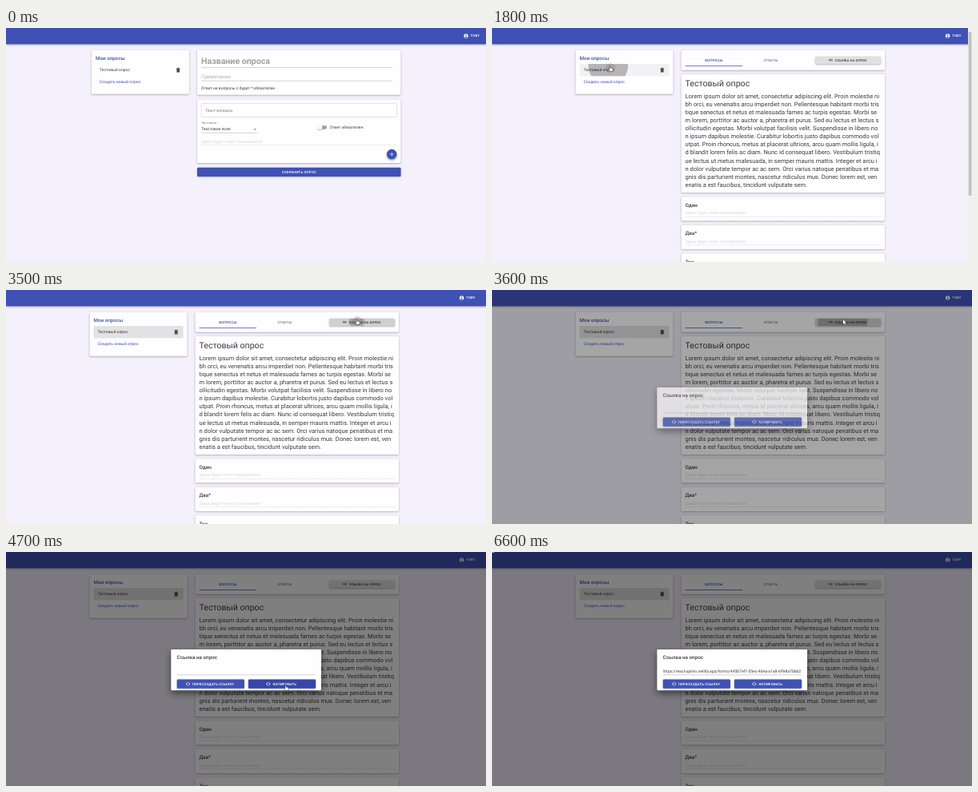
Recreate the animation shown at these times as an HTML page with a canvas. Size 600 px wide and 293 px high, loop 7.2 s.

```html
<!DOCTYPE html>
<html lang="ru">
<head>
<meta charset="utf-8">
<title>Опросы</title>
<style>
html, body { margin: 0; width: 100%; height: 100%; overflow: hidden; background: #f4f1fc; }
canvas { display: block; width: 600px; height: 293px; }
</style>
</head>
<body>
<canvas id="stage"></canvas>
<script>
const W = 600, H = 293, LOOP = 7200, STEP = 100;
const BLUE = '#3f51b5', PAPER = '#fefdff', INK = 'rgba(0,0,0,.77)', HINT = 'rgba(0,0,0,.17)';
const dpr = window.devicePixelRatio || 1;

function prepare(canvas) {
  canvas.width = W * dpr;
  canvas.height = H * dpr;
  const context = canvas.getContext('2d');
  context.scale(dpr, dpr);
  context.textRendering = 'geometricPrecision';
  return context;
}

const stage = prepare(document.getElementById('stage'));
const layer = prepare(document.createElement('canvas'));
let ctx = stage;

const LOREM = [
  'Lorem ipsum dolor sit amet, consectetur adipiscing elit. Proin molestie ni',
  'bh orci, eu venenatis arcu imperdiet non. Pellentesque habitant morbi tris',
  'tique senectus et netus et malesuada fames ac turpis egestas. Morbi se',
  'm lorem, porttitor ac auctor a, pharetra et purus. Sed eu lectus et lectus s',
  'ollicitudin egestas. Morbi volutpat facilisis velit. Suspendisse in libero no',
  'n ipsum dapibus molestie. Curabitur lobortis justo dapibus commodo vol',
  'utpat. Proin rhoncus, metus at placerat ultrices, arcu quam mollis ligula, i',
  'd blandit lorem felis ac diam. Nunc id consequat libero. Vestibulum tristiq',
  'ue lectus ut metus malesuada, in semper mauris mattis. Integer et arcu i',
  'n dolor vulputate tempor ac ac sem. Orci varius natoque penatibus et ma',
  'gnis dis parturient montes, nascetur ridiculus mus. Donec lorem est, ven',
  'enatis a est faucibus, tincidunt vulputate sem.'
];
const LINK = 'https://react-opinio.netlify.app/forms/445b7ef7-55ec-4d4a-a1a8-6ffe8a7bbb2';

// Pointer track: time, x, y
const TRACK = [
  [800, 483, 104], [1500, 147.5, 47.5], [1900, 147.5, 47.5], [2300, 187, 63],
  [3100, 438.5, 36.3], [3900, 438.5, 36.3], [4700, 349.5, 166.5],
  [5800, 349.5, 166.5], [6300, 514, 146]
];

const clamp = v => Math.min(1, Math.max(0, v));
const span = (t, from, length) => clamp((t - from) / length);
const within = (t, a, b) => t >= a && t < b;

// cubic-bezier(.4, 0, .2, 1)
function ease(x) {
  let lo = 0, hi = 1;
  for (let i = 0; i < 20; i++) {
    const u = (lo + hi) / 2, v = 1 - u;
    if (3 * v * v * u * .4 + 3 * v * u * u * .2 + u * u * u < x) lo = u; else hi = u;
  }
  return lo * lo * (3 - 2 * lo);
}

function shadow(y, blur, alpha) {
  ctx.shadowColor = `rgba(0,0,0,${alpha})`;
  ctx.shadowOffsetY = y * dpr;
  ctx.shadowBlur = blur * dpr;
}

function box(x, y, w, h, fill, r = 0) {
  ctx.beginPath();
  ctx.roundRect(x, y, w, h, r);
  ctx.fillStyle = fill;
  ctx.fill();
}

function raised(x, y, w, h, fill) {
  ctx.save();
  shadow(.7, 2.2, .34);
  box(x, y, w, h, fill, 1.25);
  ctx.restore();
}

function disc(x, y, r, fill) {
  ctx.beginPath();
  ctx.arc(x, y, r, 0, 7);
  ctx.fillStyle = fill;
  ctx.fill();
}

function path(points, color, width, dash = []) {
  ctx.beginPath();
  points.forEach(([x, y], i) => i ? ctx.lineTo(x, y) : ctx.moveTo(x, y));
  ctx.setLineDash(dash);
  ctx.strokeStyle = color;
  ctx.lineWidth = width;
  ctx.stroke();
  ctx.setLineDash([]);
}

const rule = (x1, x2, y, color = 'rgba(0,0,0,.42)', dash) =>
  path([[x1, y], [x2, y]], color, .4, dash);

// y is the middle of the line box
function text(str, x, y, size, color = INK, weight = 400, align = 'left', spacing = 0) {
  ctx.font = `${weight} ${size}px Roboto, sans-serif`;
  ctx.letterSpacing = spacing + 'px';
  ctx.textAlign = align;
  ctx.fillStyle = color;
  ctx.fillText(str, x, y + size * .342);
}

const caps = (str, x, y, color, align = 'left', size = 4.375) =>
  text(str, x, y, size, color, 500, align, size * .02857);

function appBar(right) {
  ctx.save();
  shadow(1, 2.6, .36);
  box(0, 0, W, 20.3, BLUE);
  ctx.restore();
  const x = right - 25;
  disc(x, 10, 2.7, '#fff');
  disc(x, 9.1, .85, BLUE);
  ctx.beginPath();
  ctx.ellipse(x, 11.6, 1.6, .8, 0, 0, 7);
  ctx.fill();
  caps('TOBY', right - 19.4, 10, '#fff');
}

function trash(x, y) {
  box(x - 1.9, y - 1.6, 3.8, 4.3, '#4c4c4c', .5);
  box(x - 2.3, y - 2.6, 4.6, .7, '#4c4c4c');
  box(x - .9, y - 3, 1.8, .6, '#4c4c4c');
}

function ripple(x, y, size, alpha, clip) {
  if (alpha <= 0 || size <= 0) return;
  ctx.save();
  ctx.beginPath();
  ctx.rect(...clip);
  ctx.clip();
  disc(x, y, size, `rgba(0,0,0,${alpha})`);
  ctx.restore();
}

function sidebar(t) {
  raised(107, 27.8, 122, 55, PAPER);
  text('Мои опросы', 112, 37.5, 6.25, BLUE, 500);
  const tint = t >= 2000 ? .11 : t >= 1400 ? .05 : 0;
  box(112, 45, 112, 15.3, `rgba(0,0,0,${tint})`);
  text('Тестовый опрос', 117, 52.5, 5);
  trash(215.2, 52.7);
  text('Создать новый опрос', 117, 67.7, 5, BLUE);
  ripple(147.7, 47, 78 * ease(span(t, 1645, 550)), .25 * (1 - span(t, 1850, 450)),
    [112, 45, 112, 15.3]);
}

function editor() {
  raised(239, 27.8, 254.5, 56, PAPER);
  text('Название опроса', 244, 41.3, 10.625, '#a2a2a2', 700);
  rule(244, 483, 49.6);
  text('Примечание', 244, 60.5, 6.25, '#b0b0b0');
  rule(244, 483, 66.2);
  text('Ответ на вопросы с будет * обязателен', 244, 75, 5);

  raised(239, 89.5, 254.5, 79.5, PAPER);
  ctx.beginPath();
  ctx.roundRect(244.2, 94.4, 244.6, 17, 1.25);
  ctx.strokeStyle = 'rgba(0,0,0,.3)';
  ctx.lineWidth = .4;
  ctx.stroke();
  text('Текст вопроса', 249, 102.9, 5, 'rgba(0,0,0,.54)');
  text('Тип ответа', 244, 118.6, 3.75, 'rgba(0,0,0,.54)');
  text('Текстовое поле', 244, 126.7, 5);
  rule(244, 315, 131.4);
  ctx.beginPath();
  ctx.moveTo(309.5, 126.3);
  ctx.lineTo(312.6, 126.3);
  ctx.lineTo(311.05, 127.9);
  ctx.fillStyle = 'rgba(0,0,0,.54)';
  ctx.fill();

  box(390.5, 122.3, 10.6, 4.4, '#9e9e9e', 2.2);
  ctx.save();
  shadow(.5, 1.2, .45);
  disc(392.4, 124.5, 3.1, '#fafafa');
  ctx.restore();
  text('Ответ обязателен', 404.5, 124.4, 5);
  text('Здесь будет ответ пользователя', 244, 141.8, 5, HINT);
  rule(244, 489, 146.6, 'rgba(0,0,0,.36)', [.6, .6]);

  ctx.save();
  shadow(1.2, 2.8, .45);
  disc(482.2, 158.1, 6.25, BLUE);
  ctx.restore();
  path([[480, 158.1], [484.4, 158.1]], '#fff', .65);
  path([[482.2, 155.9], [482.2, 160.3]], '#fff', .65);

  raised(239, 174.7, 254.5, 11.2, BLUE);
  caps('СОХРАНИТЬ ОПРОС', 366.3, 180.3, '#fff', 'center');
}

function linkIcon(x, y) {
  ctx.strokeStyle = '#444';
  ctx.lineWidth = .55;
  for (const dx of [-2.3, .3]) {
    ctx.beginPath();
    ctx.roundRect(x + dx, y - 1, 2, 2, 1);
    ctx.stroke();
  }
  path([[x - 1.2, y], [x + 1.2, y]], '#444', .55);
}

function linkButton(t) {
  raised(404.3, 35.7, 81.7, 9.4, within(t, 3000, 4000) ? '#d0d0d0' : '#e0e0e0');
  ripple(438.5, 39.5, 47.5 * ease(span(t, 3370, 550)), .2 * (1 - span(t, 3750, 450)),
    [404.3, 35.7, 81.7, 9.4]);
  linkIcon(423.3, 40.2);
  caps('ССЫЛКА НА ОПРОС', 428.7, 40.2, INK, 'left', 4.0625);
}

function survey(t) {
  raised(236.5, 27.8, 254.5, 25, PAPER);
  caps('ВОПРОСЫ', 277.3, 40.1, BLUE, 'center');
  caps('ОТВЕТЫ', 348.5, 40.1, 'rgba(0,0,0,.5)', 'center');
  box(241.5, 47.1, 71.5, .625, BLUE);
  linkButton(t);

  raised(236.5, 57.9, 254.5, 148.4, PAPER);
  text('Тестовый опрос', 241.5, 69.3, 10.625);
  LOREM.forEach((line, i) => text(line, 241.5, 85.7 + i * 10.03, 7.5));

  ['Один', 'Два*', 'Три'].forEach((name, i) => {
    const y = 211.6 + i * 35.3;
    raised(236.5, y, 254.5, 30, PAPER);
    text(name, 241.5, y + 10.2, 6.25, INK, 500);
    text('Здесь будет ответ пользователя', 241.5, y + 20, 5, HINT);
    rule(241.5, 486, y + 24.8, 'rgba(0,0,0,.36)', [.6, .6]);
  });
}

function scrollbar() {
  box(595, 0, 5, H, '#f1f1f1');
  box(595.7, 5, 3.7, 205, '#c1c1c1');
}

function loopIcon(x, y) {
  ctx.lineWidth = .6;
  ctx.strokeStyle = ctx.fillStyle = '#fff';
  for (const side of [0, Math.PI]) {
    ctx.save();
    ctx.translate(x, y);
    ctx.rotate(side);
    ctx.beginPath();
    ctx.arc(0, 0, 1.9, Math.PI, Math.PI * 1.75);
    ctx.stroke();
    ctx.beginPath();
    ctx.moveTo(-3, 0);
    ctx.lineTo(-.8, 0);
    ctx.lineTo(-1.9, 1.2);
    ctx.fill();
    ctx.restore();
  }
}

function mix(a, b, k) {
  return `rgb(${a.map((v, i) => Math.round(v + (b[i] - v) * k))})`;
}

function dialog(t) {
  ctx.save();
  shadow(4, 9, .5);
  box(206.3, 122, 187.7, 51.3, PAPER, 1.25);
  ctx.restore();
  text('Ссылка на опрос', 213.6, 131.8, 6.25, INK, 500);
  rule(213.6, 387, 153.9);
  if (t >= 5100) {
    ctx.save();
    ctx.beginPath();
    ctx.rect(213.6, 144, 173.4, 10);
    ctx.clip();
    text(LINK, 213.6, 149.2, 5);
    ctx.restore();
  }
  const hover = ease(span(t, 4600, 250)) * (1 - ease(span(t, 5900, 250)));
  raised(213.7, 159.6, 84.2, 11.2, BLUE);
  raised(302.9, 159.6, 84.2, 11.2, mix([63, 81, 181], [48, 63, 159], hover));
  loopIcon(227.6, 165.2);
  caps('ПЕРЕСОЗДАТЬ ССЫЛКУ', 233, 165.2, '#fff');
  loopIcon(327.9, 165.2);
  caps('КОПИРОВАТЬ', 333.4, 165.2, '#fff');
}

// Draws on a separate layer so that overlapping parts fade as one
function faded(alpha, paint) {
  layer.clearRect(0, 0, W, H);
  ctx = layer;
  paint();
  ctx = stage;
  ctx.globalAlpha = alpha;
  ctx.drawImage(layer.canvas, 0, 0, W, H);
  ctx.globalAlpha = 1;
}

function snackbar() {
  raised(6.5, 272.1, 100.4, 15, '#323232');
  text('Скопировано', 11.6, 279.6, 4.375, '#fff');
}

function outline(points, x, y) {
  ctx.beginPath();
  points.forEach(([px, py]) => ctx.lineTo(x + px, y + py));
  ctx.closePath();
  ctx.fillStyle = '#fff';
  ctx.fill();
  ctx.strokeStyle = '#222';
  ctx.lineWidth = .5;
  ctx.lineJoin = 'round';
  ctx.stroke();
}

const ARROW = [[0, 0], [0, 7.2], [1.7, 5.7], [2.9, 8.2], [4, 7.7], [2.9, 5.3], [5.1, 5.2]];
const HAND = [[-.5, 0], [.5, 0], [.6, 2.5], [3.6, 3.2], [3.9, 4.4], [3, 7], [0, 7], [-2.2, 4], [-1.6, 3.5], [-.6, 4.4]];

function pointer(t) {
  if (!within(t, 800, 6600)) return;
  const next = TRACK.findIndex(p => p[0] > t);
  let [, x, y] = TRACK[TRACK.length - 1];
  if (next > 0) {
    const a = TRACK[next - 1], b = TRACK[next];
    const k = span(t, a[0], b[0] - a[0]), s = k * k * (3 - 2 * k);
    x = a[1] + (b[1] - a[1]) * s;
    y = a[2] + (b[2] - a[2]) * s;
  }
  if (within(t, 1600, 1900) || within(t, 3400, 3600) || within(t, 5100, 5300)) {
    disc(x + .5, y + 2.6, 5.3, 'rgba(150,110,115,.25)');
    ctx.strokeStyle = 'rgba(120,70,80,.45)';
    ctx.lineWidth = .5;
    ctx.stroke();
  }
  const hand = within(t, 1400, 2200) || within(t, 3000, 3600) || within(t, 4600, 5900);
  outline(hand ? HAND : ARROW, x, y);
}

function draw(t) {
  box(0, 0, W, H, '#f4f1fc');
  const opened = t >= 1700;
  ctx.save();
  if (opened) ctx.translate(-2.5, 0);
  sidebar(t);
  ctx.restore();
  if (opened) survey(t); else editor();
  appBar(opened ? 594.6 : 600);
  if (within(t, 1700, 3500)) scrollbar();

  const fade = ease(span(t, 3500, 225));
  if (fade) {
    box(0, 0, W, H, `rgba(0,0,0,${.5 * fade})`);
    faded(fade, () => dialog(t));
  }
  if (t >= 5100) box(0, 0, 3, .7, 'rgba(255,255,255,.75)', .3);
  const toast = ease(span(t, 5300, 225)) * (1 - ease(span(t, 5850, 200)));
  if (toast) faded(toast, snackbar);
  pointer(t);
}

function tick() {
  const t = performance.now() % LOOP;
  draw(Math.floor(t / STEP) * STEP);
  requestAnimationFrame(tick);
}
tick();
</script>
</body>
</html>
```
